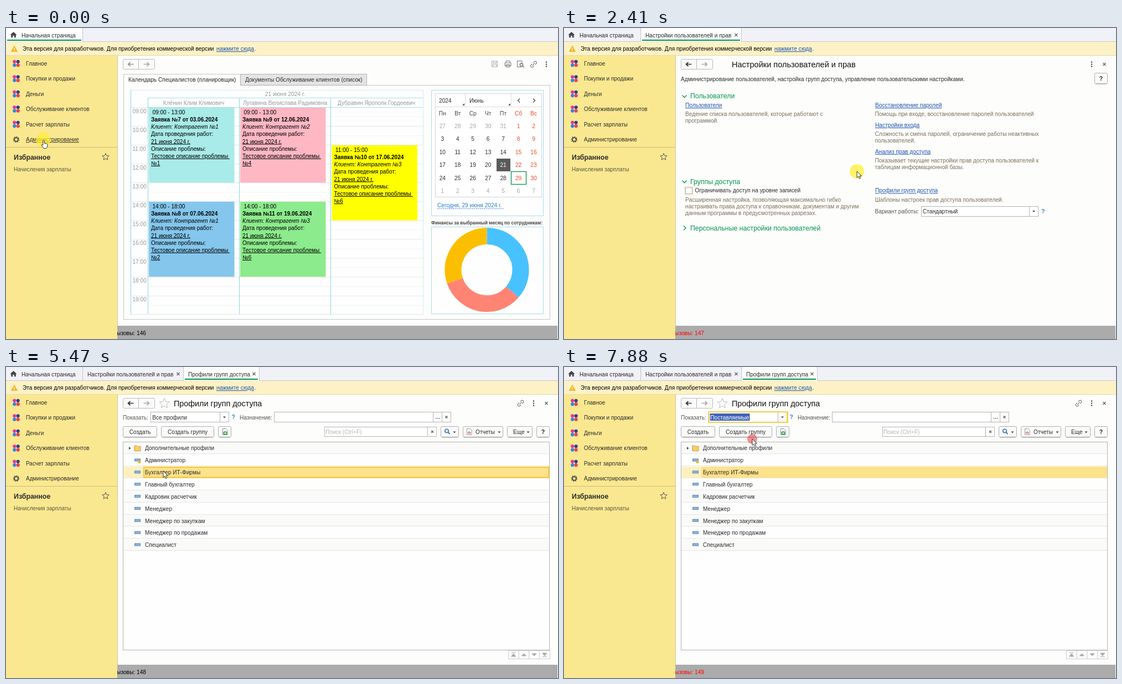
Write an HTML page that moves like this. It is 997 px wide and 562 px high and loops after 8 s.

```html
<!DOCTYPE html>
<html lang="ru">
<head>
<meta charset="utf-8">
<style>
html, body { margin: 0; width: 100%; height: 100%; overflow: hidden; background: #fff; }
svg { display: block; width: 997px; height: 562px; font-family: "Liberation Sans", Arial, sans-serif; }
text { white-space: pre; }
</style>
</head>
<body>
<svg id="stage" viewBox="0 0 997 562"></svg>
<script>
const stage = document.getElementById('stage');
const INK = '#2b2b2b', GREEN = '#009646', LINK = '#1c55ae', OLIVE = '#7a7058', GOLD = '#f7c52e', CYAN = '#8fd5de';
const LOOP = 8000;

// time, x, y, pointer shape, halo
const steps = [
  [0, 67, 202, 'hand', 'move'], [660, 67, 202, 'hand', 'move'],
  [880, 95, 190, 'arrow', 'move'], [1100, 200, 160, 'arrow', 'move'],
  [1310, 290, 142, 'hand', 'move'], [1530, 318, 138, 'hand', 'move'],
  [1750, 318, 138, 'hand', 'click'], [1970, 318, 138, 'arrow', 'move'],
  [2190, 420, 202, 'arrow', 'move'], [2410, 529, 259, 'arrow', 'move'],
  [2630, 598, 293, 'hand', 'move'], [2840, 598, 293, 'hand', 'click'],
  [3060, 598, 293, 'hand', 'move'], [3280, 598, 293, 'hand', 'move'],
  [3500, 598, 293, 'hand', 'move'], [3720, 598, 293, 'arrow', 'move'],
  [3940, 480, 255, 'arrow', 'move'], [4160, 330, 205, 'arrow', 'move'],
  [4380, 284, 188, 'arrow', 'move'], [5470, 284, 188, 'arrow', 'none'],
  [5690, 284, 188, 'arrow', 'move'], [5910, 300, 160, 'arrow', 'move'],
  [6130, 345, 125, 'arrow', 'move'], [6350, 380, 107, 'arrow', 'move'],
  [6570, 394, 92, 'arrow', 'move'], [6790, 394, 92, 'arrow', 'click'],
  [7010, 394, 92, 'arrow', 'move'], [7230, 359, 106, 'arrow', 'move'],
  [7440, 340, 130, 'arrow', 'move'], [7660, 340, 130, 'arrow', 'click'],
  [7880, 340, 130, 'arrow', 'click']
];

// Drawing helpers
const text = (x, y, s, fill = INK, size = 10.15, extra = '') =>
  `<text x="${x}" y="${y}" fill="${fill}" font-size="${size}" ${extra}>${s}</text>`;
const MID = ' text-anchor="middle"', BOLD = ' font-weight="bold"', UNDER = ' text-decoration="underline"';
const rect = (x, y, w, h, fill = 'none', stroke = 'none', extra = '') =>
  `<rect x="${x}" y="${y}" width="${w}" height="${h}" fill="${fill}" stroke="${stroke}" ${extra}/>`;
const path = (d, stroke = INK, width = 1, fill = 'none', extra = '') =>
  `<path d="${d}" fill="${fill}" stroke="${stroke}" stroke-width="${width}" ${extra}/>`;
const circle = (x, y, r, fill, extra = '') => `<circle cx="${x}" cy="${y}" r="${r}" fill="${fill}" ${extra}/>`;
const at = (x, y, body) => `<g transform="translate(${x} ${y})">${body}</g>`;
const each = (list, draw) => list.map(draw).join('');
const range = n => [...Array(n).keys()];
const link = (x, y, s) => text(x, y, s, LINK, 10.2, UNDER);
const cross = (x, y, r = 2.5, color = '#555') => path(`M${x - r} ${y - r}l${2 * r} ${2 * r}m0 ${-2 * r}l${-2 * r} ${2 * r}`, color, 1.1);
const caret = (x, y) => path(`M${x - 2.5} ${y - 1}h5l-2.5 3z`, 'none', 0, '#444');
const dots = (x, y) => each([-4, 0, 4], d => circle(x, y + d, 1.2, '#444'));
const button = (x, w, label = '', y = 107) =>
  rect(x + .5, y + .5, w - 1, 19, '#fbfbfb', '#adadad', 'rx="2"') + path(`M${x + 2} ${y + 20}h${w - 4}`, '#999') +
  text(x + w / 2, y + 13.8, label, INK, 10.2, MID);
const helpButton = y => button(958, 24, '', y) + text(970, y + 14, '?', '#222', 10.5, MID + BOLD);
const field = (x, y, w, h = 18, stroke = '#b4b4b4') => rect(x + .5, y + .5, w, h, '#fff', stroke);
const split = (x, y, h = 18) => path(`M${x + .5} ${y}v${h}`, '#b4b4b4');
const starPath = r => 'M' + range(10).map(i => {
  const a = i * Math.PI / 5, q = i % 2 ? r * .45 : r;
  return `${(q * Math.sin(a)).toFixed(2)} ${(-q * Math.cos(a)).toFixed(2)}`;
}).join('L') + 'z';
const gear = (x, y, color, r = 4) => circle(x, y, r, 'none', `stroke="${color}" stroke-width="1.6"`) +
  circle(x, y, r + 1.4, 'none', `stroke="${color}" stroke-width="2" pathLength="16" stroke-dasharray="1 1"`);
const chain = (x, y) => `<g transform="translate(${x} ${y}) rotate(-45)" fill="none" stroke="#777" stroke-width="1.2">
  <path d="M-1.5 -2.5H-4a2.5 2.5 0 0 0 0 5h2.5M1.5 -2.5H4a2.5 2.5 0 0 1 0 5H1.5M-3 0H3"/></g>`;

function navigation(active) {
  const arrow = (x, dir, color) => path(`M${x - 5 * dir} 65.5h${10 * dir}m${-4 * dir} -3.5l${4 * dir} 3.5l${-4 * dir} 3.5`, color, 1.7);
  return rect(211.5, 56.5, 57, 18, '#fbfbfb', '#b8b8b8', 'rx="2"') + path('M239.5 57v18', '#b8b8b8') +
    arrow(225.5, -1, active ? '#333' : '#999') + arrow(253.5, 1, '#aaa');
}

function tabs(t) {
  const current = t < 1970 ? 0 : t < 3280 ? 1 : 2;
  const short = t < 3720;
  const list = [[0, 138, 28, 'Начальная страница'], [139, 181, 147, 'Настройки пользователей и прав'],
    [321, short ? 106 : 136, 329, short ? 'Профили групп…' : 'Профили групп доступа']].slice(0, current + 1);
  return rect(0, 0, 997, 25, '#f1f1f8') + path('M0 24.5h997', '#c9c9cc') + each(list, ([x, w, tx, label], i) =>
    (i === current ? rect(x, 0, w, 25, '#fefefe') + rect(x + 2, 21, w - 4, 2, GREEN) : '') +
    path(`M${x + w + .5} 0v24`, '#c4c4c8') + text(tx, 16.5, label, INK, 10.1) + (i ? cross(x + w - 9, 12.5) : '')) +
    path('M7.5 12.5L13.5 7l6 5.5h-1.7v4.8h-3v-3.6h-2.6v3.6h-3v-4.8z', 'none', 0, '#444');
}

function sidebar(t) {
  const menuOpen = t >= 660 && t < 1970;
  const petals = [[-3.2, -3.2, '#e0389a'], [3.2, -3.2, '#2b3f9a'], [-3.2, 3.2, '#2f86e0'], [3.2, 3.2, '#e8405a']];
  const items = ['Главное', 'Покупки и продажи', 'Деньги', 'Обслуживание клиентов', 'Расчет зарплаты', 'Администрирование'];
  return rect(0, 50, 201, 512, '#fae890') + path('M201.5 50v488', '#c8c4b0') +
    (menuOpen ? rect(0, 188, 201, 27, '#fff') : '') + path('M0 215.5h201', '#c9bc80') +
    each(items, (label, i) => {
      const y = 64 + i * 27.5;
      return (i < 5 ? each(petals, ([dx, dy, c]) => circle(18.5 + dx, y + dy, 3.1, c)) : gear(18.5, y, '#444', 3.3)) +
        text(36, y + 3.7, label, INK, 10.05, i === 5 && t < 880 ? UNDER : '');
    }) +
    text(14, 238, 'Избранное', INK, 12.4, BOLD) +
    at(180, 233, path(starPath(6.5), menuOpen ? '#aaa' : '#555')) +
    text(14, 259.3, 'Начисления зарплаты', '#5c5840', 10.05);
}

function chrome(t) {
  const calls = t < 1970 ? 146 : t < 3280 ? 147 : t < 7880 ? 148 : 149;
  const fresh = t >= 1970 && t < 2840 || t >= 3280 && t < 5470 || t >= 7880;
  return rect(0, 0, 997, 562, '#fdfdfc') + tabs(t) +
    rect(0, 25, 997, 25, '#fdf2c5') + path('M0 49.5h997', '#e2d8a8') +
    path('M15 32.5l5.5 10h-11z', '#f3b021', 1, '#f7b928', 'stroke-linejoin="round"') + rect(14.4, 36, 1.2, 3.5, '#fff') + rect(14.4, 40.5, 1.2, 1.2, '#fff') +
    text(30, 41.2, 'Эта версия для разработчиков. Для приобретения коммерческой версии', '#000', 10.2) +
    link(380, 41.2, 'нажмите сюда') + text(448.5, 41.2, '.') +
    rect(201, 538, 795, 24, '#ababab') +
    text(253, 554.8, 'Вызовы: ' + calls, fresh ? '#f00' : '#000', 10.2, 'text-anchor="end"') + sidebar(t);
}

function appointment([x, y, color, hours, title, client, problem]) {
  const lines = [[hours], [title, BOLD], ['Клиент: Контрагент №' + client, 'font-style="italic"'], ['Дата проведения работ:'],
    ['21 июня 2024 г.', UNDER], ['Описание проблемы:'], ['Тестовое описание проблемы&#160;', UNDER], ['№' + problem, UNDER]];
  return rect(x, y, 154.5, 135.5, color) + each(lines, ([s, style], i) =>
    text(x + (i ? 4 : 6.5), y + 11.7 + i * 13.2, s, '#000', 10, style));
}

function planner() {
  const GREY = '#999';
  const people = [[339, 'Клёнин Клим Климович'], [504, 'Лугавина Велислава Радимовна'], [669, 'Дубравин Ярополк Гордеевич']];
  return rect(225.5, 112.5, 528, 405, '#fefefe', '#d0eef1') +
    each(range(22), i => path(`M${i % 2 ? 257 : 226} ${(143.5 + i * 17.03).toFixed(1)}H753`, i % 2 ? '#f2f2ee' : '#e6e6e2')) +
    path('M256 126.5H753M256 143.5H753', '#a9dde3') + path('M225.5 112v406M256.5 127v390M421.5 127v390M586.5 127v390', CYAN) +
    text(504, 123, '21 июня 2024 г.', GREY, 10.2, MID) + each(people, ([x, s]) => text(x, 138.6, s, GREY, 10.1, MID)) +
    each(range(11), i => text(228.5, 153.7 + i * 34.05, String(i + 9).padStart(2, '0') + ':00', GREY, 10.1)) +
    each([
      [258, 144, '#a8ebe8', '09:00 - 13:00', 'Заявка №7 от 03.06.2024', 1, 1],
      [423, 144, '#fdb8c4', '09:00 - 13:00', 'Заявка №9 от 12.06.2024', 2, 4],
      [258, 314, '#84c6ec', '14:00 - 18:00', 'Заявка №8 от 07.06.2024', 1, 2],
      [423, 314, '#8ceb8c', '14:00 - 18:00', 'Заявка №11 от 19.06.2024', 3, 6],
      [588.5, 212, '#ffff00', '11:00 - 15:00', 'Заявка №10 от 17.06.2024', 3, 6]
    ], appointment);
}

function calendar() {
  const RED = '#f04a23';
  const columnX = i => 788.3 + i * 27.45;
  const weekdays = ['Пн', 'Вт', 'Ср', 'Чт', 'Пт', 'Сб', 'Вс'];
  return rect(768.5, 112.5, 202, 227, '#fefefe', '#a9dde3') + rect(775.5, 118.5, 192, 187, '#fff', '#d4d4d4') +
    path('M775 142.5h192M829.5 119v23M912.5 119v23', '#dcdcdc') +
    text(782, 134.5, '2024') + text(837, 134.5, 'Июнь') +
    path('M828 136v4h-4zM911 136v4h-4z', 'none', 0, '#555') +
    path('M928 127.5l-3.5 3.5l3.5 3.5M952 127.5l3.5 3.5l-3.5 3.5', '#444', 1.2) +
    each(weekdays, (s, i) => text(columnX(i), 157.6, s, i > 4 ? RED : '#444', 10.2, MID)) +
    rect(886, 236, 25, 23, '#5a5a5a') + rect(912.5, 259.5, 27, 23, 'none', GREEN, 'stroke-width="1.3"') +
    each(range(42), i => {
      const day = i - 4, column = i % 7;
      const label = day < 1 ? day + 31 : day > 30 ? day - 30 : day;
      const color = label !== day ? '#a5a5a5' : day === 21 ? '#fff' : column > 4 ? RED : INK;
      return text(columnX(column), 181 + Math.floor(i / 7) * 23.4, label, color, 10.2, MID);
    }) +
    text(779, 323.8, 'Сегодня, 29 июня 2024 г.', '#2a7fd0') + path('M779 326.5h120', '#2a7fd0', 1, 'none', 'stroke-dasharray="2 1.5"');
}

function donut() {
  const slices = [[0, 131, '#47c2ff'], [131, 251, '#ff8474'], [251, 360, '#fcbf00']];
  return text(768, 354.8, 'Финансы за выбранный месяц по сотрудникам:', '#444', 8.4, BOLD) +
    rect(768.5, 359.5, 202, 157, '#fefefe', '#a9dde3') +
    each(slices, ([from, to, color]) => circle(868.5, 437, 61, 'none',
      `stroke="${color}" stroke-width="30" pathLength="360" stroke-dasharray="${to - from} 360" transform="rotate(${from - 90} 868.5 437)"`));
}

function home() {
  return navigation(false) +
    path('M877.5 60h10v10h-10zM880 60v3.5h5.5V60M879.5 70v-4h6.5v4', '#aaa') +
    path('M903 63v-3.5h7V63M901 63h11v5h-11zM903 66.5h7v4h-7z', '#777') +
    path('M931 70.5h-7.5v-11h8.5v4', '#777') + circle(931, 66.5, 2.7, 'none', 'stroke="#666" stroke-width="1.2"') + path('M933 68.5l2.5 2.5', '#666', 1.3) +
    chain(953, 65.5) + dots(976, 65.5) +
    rect(212.5, 103.5, 770, 423, '#fdfdfc', '#c6c6c6') +
    path('M212.5 104V83.5H423.5V104', '#c6c6c6', 1, '#fdfdfc') + rect(423.5, 83.5, 228, 20, '#e4e4e4', '#b0b0b0') +
    text(221, 97.2, 'Календарь Специалистов (планировщик)') + text(432, 97.2, 'Документы Обслуживание клиентов (список)') +
    planner() + calendar() + donut();
}

function menu() {
  const columns = [
    [234, ['Обслуживание', 'Общие настройки', 'Настройки пользователей и прав', 'Интернет-поддержка и сервисы']],
    [439.5, ['Органайзер', 'Синхронизация данных', 'Настройки работы с файлами', 'Печатные формы, отчеты и обработки']]
  ];
  return rect(201.5, 3.5, 793, 531, '#fdfdfc', '#c0c0c0') +
    field(746, 26, 187) + split(917, 27) + text(748, 39.2, 'Поиск (Ctrl+F)', '#b5b5b5') + cross(925.5, 35.5, 2) +
    gear(949.5, 35.5, '#666', 3.5) + cross(974, 36) +
    each(columns, ([x, items]) => each(items, (s, i) => text(x, 101.8 + i * 19.8, s))) +
    rect(232.5, 130.5, 159, 14, 'none', '#999') +
    text(655, 100.3, 'Отчеты', GREEN, 12.3) + text(671, 124, 'Отчеты администратора');
}

function settings() {
  const note = (x, y, ...lines) => each(lines, (s, i) => text(x, y + i * 12, s, OLIVE, 10.2));
  const section = (y, s, open = true) => text(228, y + 4.3, s, GREEN, 12.3) +
    path(open ? `M213.5 ${y - 1.5}l4 4l4 -4` : `M216 ${y - 4}l4 4l-4 4`, GREEN, 1.3);
  return navigation(true) + text(303, 70.5, 'Настройки пользователей и прав', '#111', 14.55) + dots(953, 65.5) + cross(976, 65.5) +
    text(211, 96.2, 'Администрирование пользователей, настройка групп доступа, управление пользовательскими настройками.', INK, 10.12) +
    helpButton(81) +
    section(123, 'Пользователи') + link(219, 143.2, 'Пользователи') +
    note(219, 159.3, 'Ведение списка пользователей, которые работают с', 'программой.') +
    link(562, 143.2, 'Восстановление паролей') + note(561.5, 159.3, 'Помощь при входе, восстановление паролей пользователей') +
    link(562, 179, 'Настройки входа') + note(561.5, 195, 'Сложность и смена паролей, ограничение работы неактивных', 'пользователей.') +
    link(562, 226.8, 'Анализ прав доступа') + note(561.5, 242.8, 'Показывает текущие настройки прав доступа пользователей к', 'таблицам информационной базы.') +
    section(277.3, 'Группы доступа') + rect(218, 286.5, 15, 15, 'none', '#f0e3a8') + rect(219.5, 288.5, 12, 11, '#fff', '#aaa') +
    text(236.5, 297.4, 'Ограничивать доступ на уровне записей') +
    note(219, 313.8, 'Расширенная настройка, позволяющая максимально гибко', 'настраивать права доступа к справочникам, документам и другим', 'данным программы в предусмотренных разрезах.') +
    link(562, 297.4, 'Профили групп доступа') + note(561.5, 313.5, 'Шаблоны настроек прав доступа пользователей.') +
    text(561.5, 335.3, 'Вариант работы:', '#555') + field(645, 322, 211) + split(840, 323) + text(648, 335.3, 'Стандартный') + caret(848.5, 331) +
    text(862, 335.3, '?', '#2a86c8', 10.5, BOLD) +
    section(361.3, 'Персональные настройки пользователей', false);
}

function profileList(t) {
  const rows = ['Дополнительные профили', 'Администратор', 'Бухгалтер ИТ-Фирмы', 'Главный бухгалтер', 'Кадровик расчетчик',
    'Менеджер', 'Менеджер по закупкам', 'Менеджер по продажам', 'Специалист'];
  const selected = t < 5470 ? 0 : 2, height = 21.85;
  const selection = top => rect(212, top, 36, 20.5, '#fdf0c0') + rect(248, top, 733, 20.5, '#fde28c') +
    (t < 6790 ? rect(249, top + 1, 731.5, 18.5, 'none', GOLD, 'stroke-width="2"') : '');
  return rect(211.5, 135.5, 770, 376, '#fefefe', '#b4b4b4') + each(rows, (label, i) => {
    const top = 136 + i * height, y = top + 10.7;
    const icon = i ? rect(232.5, y - 2.5, 10, 4, '#8db4d8', '#5b88b4') + (i === 1 ? circle(241, y + 3, 2.6, '#f2b51d') : '')
      : path(`M232 ${y + 5}v-9.5h4l1.5 1.5h5.5v8z`, '#c99a2c', 1, '#f8cf6a') + path(`M222 ${y - 2.5}l3.5 2.5l-3.5 2.5z`, 'none', 0, '#444');
    return (i % 2 ? '' : rect(212, top, 769, height, '#fafaf8')) + path(`M212 ${Math.floor(top + height) - .5}h769`, '#e6e6e6') +
      (i === selected ? selection(Math.round(top)) : '') + icon + text(251, y + 3.7, label);
  });
}

function profiles(t) {
  const focused = t >= 6790, choice = t < 7880 ? 'Все профили' : 'Поставляемые', open = t >= 7010 && t < 7880;
  const hovered = t < 7440 ? 0 : 1;
  const scroll = ['M-4 -3.5h8M-4 3l4 -5l4 5z', 'M-4 2l4 -4l4 4z', 'M-4 -2l4 4l4 -4z', 'M-4 3.5h8M-4 -3l4 5l4 -5z'];
  return navigation(true) + at(286, 66, path(starPath(9.5), '#bbb')) + text(303, 70.5, 'Профили групп доступа', '#111', 14.35) +
    chain(929.5, 65.5) + dots(953, 65.5) + cross(976, 65.5) +
    text(211, 94.5, 'Показать:', '#555') + field(261, 81, 141, 18, focused ? GOLD : '#b4b4b4') + split(386, 82, 17) + caret(394.5, 90.5) +
    (focused ? rect(261, 81, 143, 19, 'none', GOLD, 'stroke-width="1.5"') + rect(263.5, 84, t < 7880 ? 63 : 72, 13, '#3f63b8') : '') +
    text(264.3, 94.5, choice, focused ? '#fff' : INK) + text(407.5, 94.3, '?', '#2a86c8', 10.5, BOLD) +
    text(422, 94.5, 'Назначение:', '#555') + field(484, 81, 319) + split(771, 82) + split(787, 82) +
    each([776, 779, 782], x => rect(x, 92, 1.4, 1.4, '#444')) + cross(795.5, 90.5, 2) +
    button(211, 62, 'Создать') + button(280, 96, 'Создать группу') + button(383, 24) +
    path('M391.5 111.5h5.5l3 3v8h-8.5z', '#888', 1, '#fff') + circle(396, 119.5, 3.6, '#35a853') + path('M394 119.5h4m-2 -2v4', '#fff', 1.1) +
    field(575, 108, 202, 17) + split(761, 109, 17) + text(577, 120.8, 'Поиск (Ctrl+F)', '#b5b5b5') + cross(770, 117, 2) +
    button(785, 33) + circle(796, 115.5, 3.2, 'none', 'stroke="#3a76b5" stroke-width="1.6"') + path('M798.5 118l3 3.2', '#3a76b5', 1.9) + caret(810, 117.5) +
    button(825, 73) + path('M832.5 111.5h6l2.5 2.5v8.5h-8.5z', '#999', 1, '#fff') + path('M834.8 120.5v-3m2 3v-4.5m2 4.5v-2.5', '#c05038', 1.2) +
    text(848, 120.8, 'Отчеты') + caret(891, 117.5) + button(905, 46) + text(916, 120.8, 'Еще') + caret(943, 117.5) +
    helpButton(107) + profileList(t) +
    each(scroll, (d, i) => rect(907.5 + i * 18.7, 512.5, 18.7, 15, '#fdfdfd', '#cfcfcf') + at(916.7 + i * 18.7, 520, path(d, '#aaa', 1, '#aaa'))) +
    (open ? rect(266, 103, 250, 88, '#0002') + rect(264.5, 101.5, 250, 88, '#fefefe', '#8a8a8a') + rect(265, 102 + hovered * 21.8, 249, 21.8, '#fbc817') +
      each(['Все профили', 'Поставляемые', 'Непоставляемые', 'Устаревшие'], (s, i) => text(278, 116.6 + i * 21.8, s)) : '');
}

function pointer([t, x, y, shape, halo]) {
  const rings = {
    move: circle(0, 0, 13, '#ffee30', 'opacity=".72"'),
    click: circle(0, 0, t < 7880 ? 12 : 9, '#e23c3c', 'opacity=".55"'),
    none: ''
  };
  const shapes = {
    arrow: 'M0 0v11.5l2.7 -2.4l1.9 4.4l2 -.9l-1.9 -4.2h3.7z',
    hand: 'M-.2 2a1.2 1.2 0 0 1 2.4 0v4.2l4.6 1q1.4 .4 1.2 2l-.8 4q-.2 1.6 -1.4 2.4h-4.6q-1.4 -2.6 -4 -5.4q-.4 -1.6 1.2 -1.4l1.4 1.2z'
  };
  return at(x, y, rings[halo] + path(shapes[shape], '#222', .9, '#fff', 'stroke-linejoin="round"'));
}

function scene(step) {
  const t = step[0];
  const page = t < 660 ? home() : t < 1970 ? menu() : t < 3280 ? settings() : profiles(t);
  return chrome(t) + page + pointer(step);
}

let shown;
function tick() {
  const now = performance.now() % LOOP;
  const step = steps.findLast(([start]) => start <= now);
  if (step !== shown) stage.innerHTML = scene(shown = step);
  requestAnimationFrame(tick);
}
tick();
</script>
</body>
</html>
```
